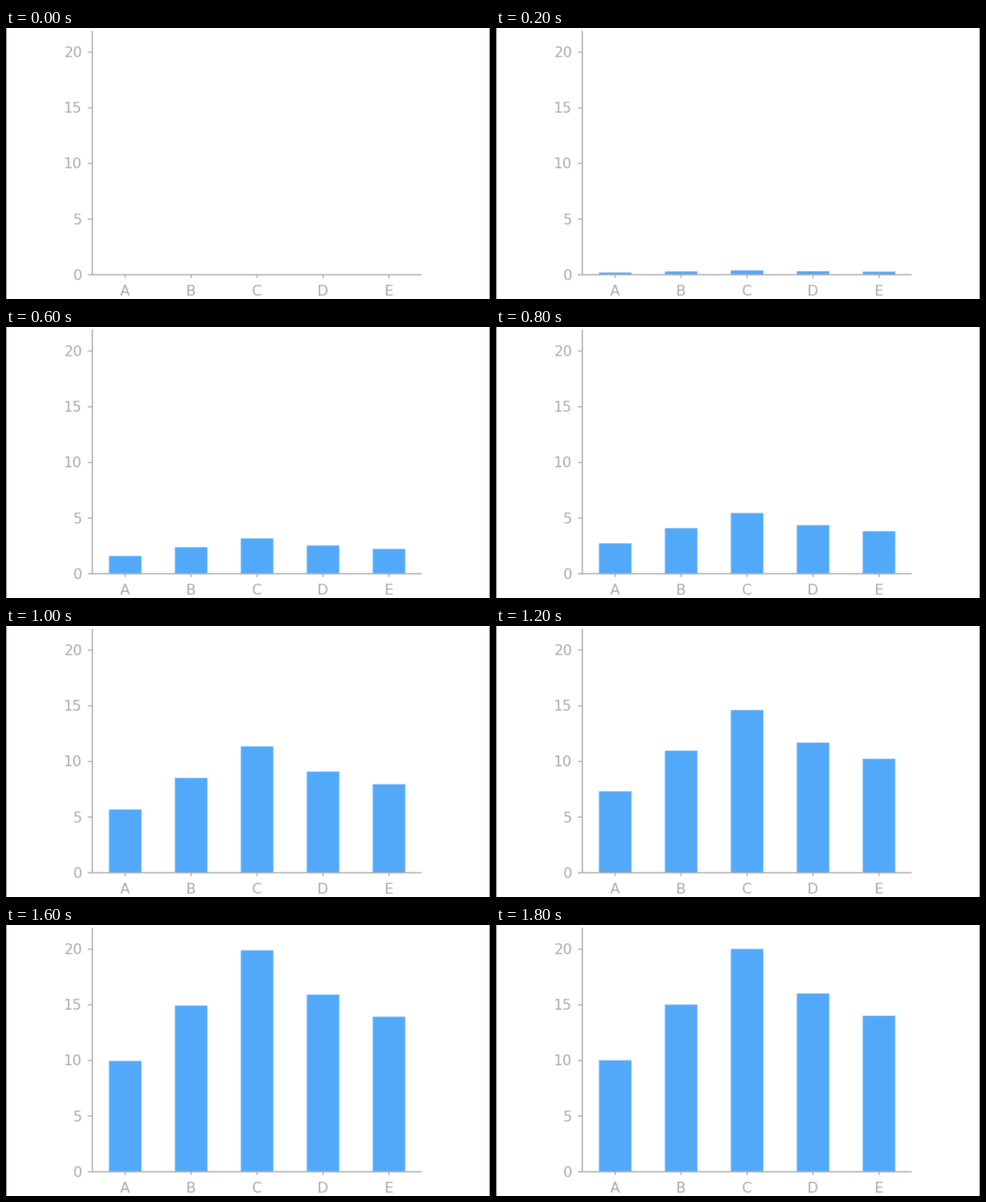
Write a matplotlib script that moves like this. It is 712 by 400 pixels and loops after 1.9 s.

```python
import numpy as np
import matplotlib.pyplot as plt
from matplotlib.animation import FuncAnimation
from matplotlib.patches import Rectangle

W, H, DPI = 712, 400, 100
PX = 72 / DPI                       # points per pixel
BASE, UNIT = 364, 16.43             # baseline and pixels per value
AXIS_X, FIRST, STEP, BAR_W = 127, 175.4, 97, 47.8
BLUE, GREY, EDGE = "#53a9f9", "#aaaaad", "#7c7c7c"

VALUES = dict(A=10, B=15, C=20, D=16, E=14)
# Share of the full height reached at each 200 ms step
GROWTH = [0, 0.019, 0.045, 0.158, 0.272, 0.567, 0.730, 0.950, 0.994, 1]

fig = plt.figure(figsize=(W / DPI, H / DPI), dpi=DPI, facecolor="white")
ax = fig.add_axes([0, 0, 1, 1])
ax.set(xlim=(0, W), ylim=(H, 0))
ax.axis("off")


def soften(img, dpi, side=0.18, pad=2):
    """Blur the alpha channel a little, keeping one flat colour."""
    rgb = img[np.unravel_index(img[..., 3].argmax(), img.shape[:2])][:3]
    alpha = np.pad(img[..., 3], pad)
    for axis in (0, 1):
        alpha = ((1 - 2 * side) * alpha
                 + side * (np.roll(alpha, 1, axis) + np.roll(alpha, -1, axis)))
    out = np.empty(alpha.shape + (4,))
    out[..., :3] = rgb
    out[..., 3] = alpha
    return out, -pad, -pad


def box(x, y, w, h, color, z=1, soft=True):
    patch = Rectangle((x, y), w, h, fc=color, lw=0, zorder=z, snap=False)
    if soft:
        patch.set_agg_filter(soften)
    return ax.add_patch(patch)


def label(x, y, text, align):
    item = ax.text(x, y, text, color=GREY, family="DejaVu Sans",
                   size=21 * PX, ha=align, va="baseline", zorder=3)
    item.set_agg_filter(soften)


for x in (0, W - 1):
    box(x, 0, 1, H, EDGE, soft=False)

box(AXIS_X - 0.9, 4, 1.8, BASE - 4, GREY, 3)
box(120.5, BASE - 0.7, 491, 1.8, GREY, 3)

for value in range(0, 21, 5):
    y = BASE - value * UNIT
    if value:
        box(120.5, y - 0.6, 6, 1.7, GREY, 3)
    label(112, y + 7.7, str(value), "right")

bars = []
for i, name in enumerate(VALUES):
    x = FIRST + i * STEP
    box(x - 0.9, BASE, 1.8, 5, GREY, 3)
    label(x, 394.7, name, "center")
    bars.append(box(x - BAR_W / 2, BASE, BAR_W, 0, BLUE, 2))


def draw(frame):
    share = GROWTH[frame // 2]
    for bar, value in zip(bars, VALUES.values()):
        height = share * value * UNIT
        bar.set_y(BASE - height)
        bar.set_height(height)
        bar.set_visible(height > 0)
    return bars


anim = FuncAnimation(fig, draw, frames=19, interval=100, repeat=True,
                     repeat_delay=0, blit=False)
plt.show()
```
